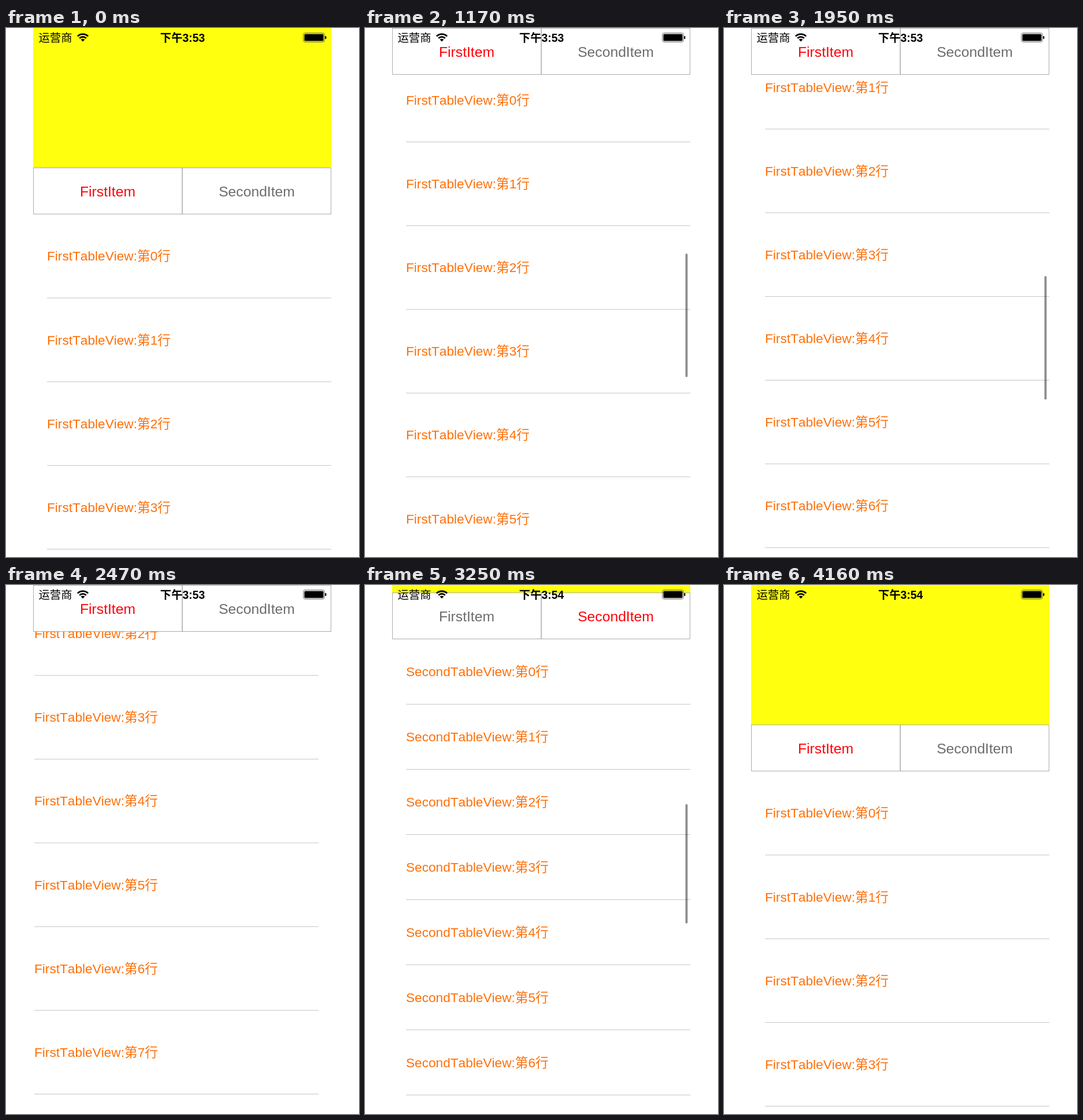
Write an HTML page with a canvas that moves like this. It is 611 by 917 pixels and loops after 4.55 s.

```html
<!DOCTYPE html>
<html lang="zh">
<head>
<meta charset="utf-8">
<title>Paged tables</title>
<style>
html, body { margin: 0; width: 100%; height: 100%; overflow: hidden; background: #fff; }
canvas { display: block; }
</style>
</head>
<body>
<canvas id="stage" width="611" height="917"></canvas>
<script>
const ctx = document.getElementById('stage').getContext('2d');
const STEP = 130, STEPS = 35;
const LEFT = 47, WIDTH = 516, RIGHT = LEFT + WIDTH, HEIGHT = 917;
const PT = WIDTH / 320;
const HEADER = 150 * PT, TAB = 50 * PT;
const FONT = '"Liberation Sans", "Noto Sans CJK SC", "Noto Sans CJK", sans-serif';

const TABLES = [
  { title: 'FirstTableView', row: 90 * PT, thumb: 214, ratio: 0.233 },
  { title: 'SecondTableView', row: 70 * PT, thumb: 207, ratio: 0.226 }
];

// Keys are [step, value], linear in between.
const FIRST_SCROLL = [[0, 0], [1, 12], [3, 48], [4, 95], [5, 121.5], [7, 185],
  [9, 270.5], [10, 300], [12, 350], [15, 438], [16, 530], [17, 601.5]];
const SECOND_SCROLL = [[24, HEADER], [25, 229], [28, 99], [29, 55], [30, 0]];
const PAGE = [[18, 0], [19, 22], [20, 65], [21, 120], [22, 340], [23, WIDTH]];

function at(keys, step) {
  if (step <= keys[0][0]) return keys[0][1];
  for (let i = 1; i < keys.length; i++) {
    const [a, from] = keys[i - 1], [b, to] = keys[i];
    if (step <= b) return from + (to - from) * (step - a) / (b - a);
  }
  return keys[keys.length - 1][1];
}

function text(str, x, y, size, color, weight = 400, align = 'left') {
  ctx.font = `${weight} ${size}px ${FONT}`;
  ctx.fontKerning = 'none';
  ctx.textAlign = align;
  ctx.fillStyle = color;
  ctx.fillText(str, x, y);
}

function box(x, y, w, h, color) {
  ctx.fillStyle = color;
  ctx.fillRect(x, y, w, h);
}

function pill(x, y, w, h, r, color) {
  ctx.beginPath();
  ctx.roundRect(x, y, w, h, r);
  ctx.fillStyle = color;
  ctx.fill();
}

function drawTable(table, shift, scroll, top) {
  ctx.save();
  ctx.beginPath();
  ctx.rect(LEFT, top, WIDTH, HEIGHT - top);
  ctx.clip();
  for (let i = 0; i < 12; i++) {
    const y = HEADER + TAB + i * table.row - scroll;
    if (y > HEIGHT) break;
    text(`${table.title}:第${i}行`, LEFT + 24 + shift, y + table.row / 2 + 8.4, 22.65, '#ff6f08', 300);
    box(LEFT + 24 + shift, y + table.row - 0.1, WIDTH - 24, 1, '#c4c4c6');
  }
  ctx.restore();
}

function drawTabs(top, active) {
  const y = Math.round(top), h = 81, mid = 305;
  box(LEFT, y, WIDTH, h, '#fff');
  ['FirstItem', 'SecondItem'].forEach((name, i) => {
    const x = LEFT + WIDTH * (i + 0.5) / 2;
    text(name, x, y + 49.5, 24.7, i === active ? '#ff0008' : '#6c6c6c', 400, 'center');
  });
  ctx.strokeStyle = '#adadad';
  ctx.lineWidth = 1;
  ctx.strokeRect(LEFT + 0.5, y + 0.5, WIDTH - 1, h - 1);
  box(mid - 0.6, y, 1.4, h, '#a4a4a4');
}

function drawWifi(x, y) {
  ctx.strokeStyle = '#000';
  ctx.lineWidth = 2.7;
  for (const r of [8.2, 12.9]) {
    ctx.beginPath();
    ctx.arc(x, y, r, -Math.PI * 0.75, -Math.PI * 0.25);
    ctx.stroke();
  }
  ctx.beginPath();
  ctx.moveTo(x, y);
  ctx.arc(x, y, 4.8, -Math.PI * 0.75, -Math.PI * 0.25);
  ctx.fillStyle = '#000';
  ctx.fill();
}

function drawStatus(clock) {
  text('运营商', 56.5, 23.5, 19.35, '#000', 300);
  drawWifi(133, 23.5);
  text('下午' + clock, 305.5, 23.5, 19.35, '#000', 600, 'center');
  ctx.beginPath();
  ctx.roundRect(514.7, 8.7, 36.6, 15.6, 3);
  ctx.strokeStyle = '#555';
  ctx.lineWidth = 0.9;
  ctx.stroke();
  pill(516.4, 10.4, 33.2, 12.2, 1.6, '#000');
  pill(552.2, 14, 2.2, 5, 1.2, '#000');
}

function draw(step) {
  const active = step >= 24 && step < 32 ? 1 : 0;
  const page = step < 32 ? at(PAGE, step) : 0;
  const first = step < 32 ? at(FIRST_SCROLL, step) : 0;
  const second = at(SECOND_SCROLL, step);
  const scroll = active ? second : first;
  const tabTop = Math.max(0, HEADER - scroll);

  box(0, 0, 611, HEIGHT, '#fff');
  box(LEFT, 0, WIDTH, Math.round(tabTop), '#ffff0e');
  const listTop = Math.round(tabTop) + 81;
  if (page < WIDTH) drawTable(TABLES[0], -page, first, listTop);
  if (page > 0) drawTable(TABLES[1], WIDTH - page, second, listTop);
  drawTabs(tabTop, active);

  const scrolling = (step >= 1 && step <= 18) || (step >= 25 && step < 32);
  if (scrolling) {
    const table = TABLES[active];
    pill(RIGHT - 8.4, 328 + scroll * table.ratio, 3.8, table.thumb, 1.9, 'rgba(0,0,0,0.45)');
  }
  drawStatus(step < 24 ? '3:53' : '3:54');
}

const start = performance.now();
function tick() {
  const elapsed = performance.now() - start;
  draw(Math.floor(elapsed / STEP) % STEPS);
  requestAnimationFrame(tick);
}
tick();
</script>
</body>
</html>
```
